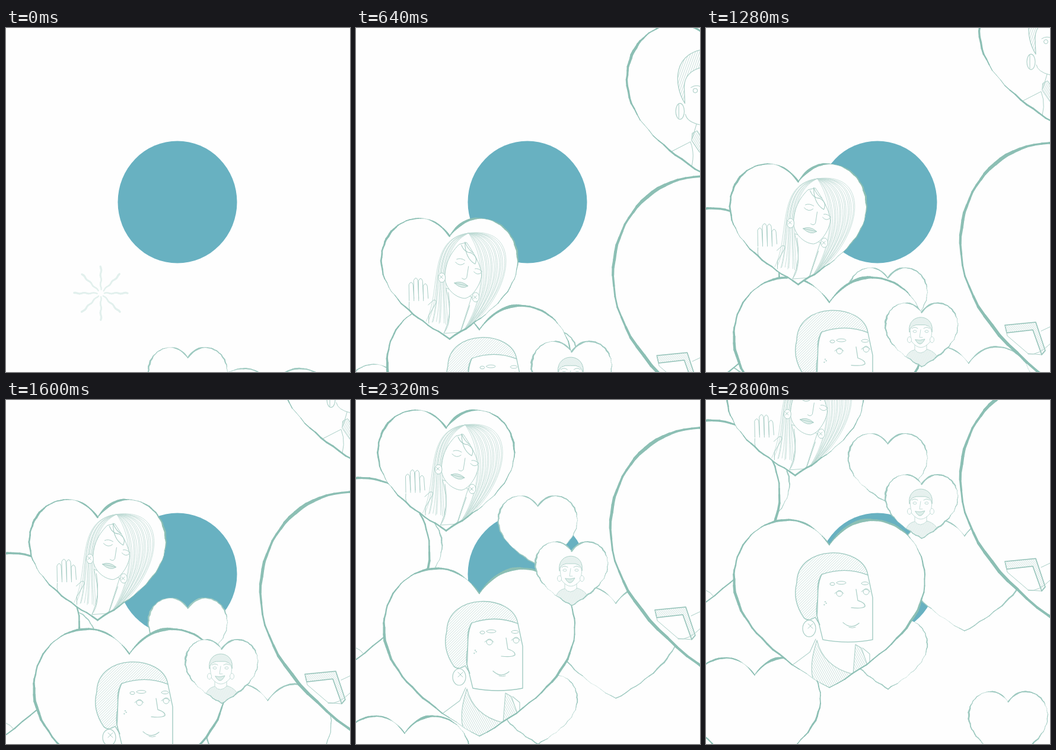
Write an HTML page with a canvas that moves like this. It is 580 by 580 pixels and loops after 2.88 s.

```html
<!DOCTYPE html>
<html lang="en">
<head>
<meta charset="utf-8">
<title>Floating hearts</title>
<style>
html, body { margin: 0; width: 100%; height: 100%; overflow: hidden; background: #fefefe; }
canvas { display: block; width: 580px; height: 580px; }
</style>
</head>
<body>
<canvas id="stage" width="580" height="580"></canvas>
<script>
const ctx = document.getElementById('stage').getContext('2d');
const LOOP = 2880, STEP = 80, POP_TIME = 480;
const REST = 2320;    // time at which x and y of each heart are given
const MIDDLE = .62;   // height of a heart's centre below its notch, in half widths
const PAPER = '#fefefe', INK = '#a9cec6', STRONG = '#9cc8bf', SOFT = '#bddad4';

const bezier = (a, b, c, d, t) => {
  const u = 1 - t;
  return u * u * u * a + 3 * u * u * t * b + 3 * u * t * t * c + t * t * t * d;
};

// Left half of a heart in half widths, notch at the origin, then mirrored.
const HALF = [
  [0, 0, -.12, -.17, -.28, -.27, -.45, -.26],
  [-.45, -.26, -.78, -.25, -1, .03, -1, .36],
  [-1, .36, -1, .82, -.55, 1.18, 0, 1.5]
];
const leftSide = HALF.flatMap(c => Array.from({ length: 20 }, (_, i) => [
  bezier(c[0], c[2], c[4], c[6], i / 20),
  bezier(c[1], c[3], c[5], c[7], i / 20)
])).concat([[0, 1.5]]);
const outline = leftSide.concat(leftSide.slice(0, -1).reverse().map(([x, y]) => [-x, y]));

function line(d, width = 1, color = INK, fill) {
  const path = new Path2D(d);
  if (fill) { ctx.fillStyle = fill; ctx.fill(path); }
  ctx.lineWidth = width;
  ctx.strokeStyle = color;
  ctx.stroke(path);
}

function hatched(d, slope, gap, width, color = INK) {
  ctx.save();
  ctx.clip(new Path2D(d));
  ctx.beginPath();
  for (let x = -600; x < 1300; x += gap) {
    ctx.moveTo(x, 0);
    ctx.lineTo(x - 600 * slope, 600);
  }
  ctx.lineWidth = .8;
  ctx.strokeStyle = SOFT;
  ctx.stroke();
  ctx.restore();
  line(d, width, color);
}

function oval(x, y, rx, ry = rx, width = 1, color = INK, fill) {
  line(`M${x - rx} ${y}a${rx} ${ry} 0 1 1 ${2 * rx} 0a${rx} ${ry} 0 1 1 ${-2 * rx} 0`, width, color, fill);
}

// Shallow arch used for brows, lids and mouths; a negative bend sags.
function arch(x, y, span, bend, width = 1, tilt = 0) {
  line(`M${x} ${y}q${span / 2} ${tilt / 2 - bend} ${span} ${tilt}`, width);
}

const cross = (x, y, r) => line(`M${x - r} ${y - r}l${2 * r} ${2 * r}m0 ${-2 * r}l${-2 * r} ${2 * r}`);

function drawMan() {
  line('M195 376C185 398 190 425 187 445L197 486Q240 494 281 486L281 415L273 377', 1.3, STRONG);
  hatched('M184 448Q172 456 165 449Q145 420 153 390C154 324 265 326 273 377Q235 362 195 376C183 395 192 410 187 425Q184 445 192 461Z', 1, 4.4, 1.3, STRONG);
  oval(174, 467, 11, 14, 1.2, INK, PAPER);
  cross(176, 463, 4);
  oval(213, 392, 4, 2.5);
  oval(228, 390, 8, 2.5);
  oval(268, 391, 6, 2.5);
  for (const x of [225, 270]) {
    oval(x, 408 - (x - 225) / 15, 5);
    arch(x - 8, 408 - (x - 225) / 15, 15, 8);
  }
  line('M253 401L256 420Q269 424 268 430Q263 434 245 432', 1.2);
  arch(231, 457, 27, -12, 1.2, 1);
  arch(241, 465, 11, -2);
  for (let i = 0; i < 3; i++) oval(201 + 2 * Math.sin(i * 2), 422 + i * 2.5, .7);
  hatched('M187 487C181 507 175 528 180 552L208 567L274 534L262 500L252 494L248 544Q198 532 187 487Z', -.55, 3.5, 1.1);
  line('M185 485L175 507L144 530M276 531L276 510L264 500', 1.1);
}

// Sweep of hair from the crown, spread from an inner to an outer curve.
function strands(count, inner, outer) {
  for (let i = 0; i <= count; i++) {
    const p = inner.map((v, k) => v + (outer[k] - v) * i / count + Math.sin(i * 2.3 + k) * 1.5);
    line(`M184 42C${p}`, .8, SOFT);
  }
}

function drawWoman() {
  strands(15, [205, 70, 218, 130, 182, 200], [275, 30, 265, 140, 175, 208]);
  strands(9, [140, 62, 142, 120, 150, 195], [112, 50, 140, 140, 113, 190]);
  line('M146 135Q160 190 142 211L170 209L189 150Z', .9, INK, PAPER);
  line('M168 61C149 80 145 98 144 116C144 133 160 151 178 152C193 149 206 124 206 112C205 94 191 73 181 58Z', 1, INK, PAPER);
  line('M172 62Q177 75 188 75Q201 82 195 94Q178 84 178 57Q183 70 192 75', 1.1, INK, PAPER);
  oval(139, 117, 6, 8, 1, INK, PAPER);
  oval(196, 150, 6, 8, 1, INK, PAPER);
  cross(138, 116, 2.5);
  cross(195, 150, 2.5);
  arch(162, 91, 15, -7, 1, 2);
  arch(164, 86, 14, 4, 1, 2);
  arch(193, 107, 12, -6, 1, 2);
  arch(195, 102, 12, 4, 1, 5);
  line('M184 98L181 117Q178 122 173 118');
  line('M160 126Q172 121 183 131Q173 138 160 126L183 131', 1, INK, '#dfeeea');
  line('M150 142Q157 180 143 210M186 164L171 208');
  line('M84 158Q82 175 91 181V190M116 163L125 155Q131 154 129 160L117 181V194');
  for (let i = 0; i < 4; i++) {
    const x = 84 + i * 8, top = 121 + 4 * (i - 1.4) ** 2;
    line(`M${x} 156L${x - .5} ${top}q4 -8 7 0L${x + 8} 152`);
  }
}

function drawBoy() {
  line('M344 286L346 303Q362 325 379 303L381 286', .9, SOFT);
  hatched('M343 288C338 255 386 255 381 288Q379 274 362 276Q344 274 343 288Z', .6, 2.2, .9);
  for (const side of [-1, 1]) {
    oval(362 + side * 19, 301, 3.5, 5, .9, SOFT, PAPER);
    oval(362 + side * 10, 287, 3, 2, .9, SOFT);
    arch(362 + side * 10 - 5, 282, 10, 4, .9);
    line(`M${362 + side * 10} 310v8`, .9, SOFT);
  }
  line('M362 284L360 297H365', .9, SOFT);
  line('M353 301Q361 303 369 300Q361 316 353 301Z', .9, INK, '#dfeeea');
  hatched('M336 334Q340 320 352 318Q361 329 373 317Q388 322 391 333L363 348Z', -.7, 2.4, .9, SOFT);
}

function drawBook() {
  hatched('M504 354L556 349L572 397L566 404L551 362L507 367Z', .8, 3.2, 1.5, '#92c1b7');
  line('M504 354L508 372L543 402L566 404M543 403Q560 406 582 384M565 364L582 356');
}

function drawListener() {
  hatched('M556 132C538 104 532 44 600 42V70C560 74 554 92 555 108Z', .35, 3.5, 1.2);
  oval(548, 145, 7, 13, 1.1, INK, PAPER);
  line('M546 134V156M557 150Q559 162 580 167M575 166L568 190');
  arch(566, 106, 18, 6);
  oval(573, 111, 3.5);
  hatched('M568 181L576 177L600 212H580L567 193Z', .5, 3, 1);
  line('M526 215L565 195Q575 220 562 250');
}

const drawSleeve = () => line('M-8 416Q11 419 15 434');

// x, y: notch at REST. rise: upward speed, acceleration and jerk there, per second.
const hearts = [
  { x: 55, y: 213, half: 90, rise: [222, -20, -30], drift: -9, pen: 1.6 },
  { x: -78, y: 184, half: 202, rise: [194, 40, -40], pen: 2.8, pop: 700, art: drawSleeve },
  { x: 438, y: 343, half: 107, rise: [241, 4, -139], drift: -4.5, pen: 1.6 },
  { x: 306.5, y: 179, half: 66.5, rise: [235, -45, -139], pen: 1.5 },
  { x: 307, y: 481, half: 66, rise: [183, 45, 0], pen: 1.3 },
  { x: 82, y: 562, half: 111, rise: [195, 40, 0], pen: 2 },
  { x: 509.5, y: 612, half: 66.5, rise: [205, 40, 0], pen: 1.5 },
  { x: 608, y: -250, half: 147, rise: [200, -30, -118], pen: 2.6, pop: 220, art: drawListener, anchor: [608, 40] },
  { x: 702, y: 118, half: 273, rise: [165, 30, -45], pen: 4, pop: 495, art: drawBook },
  { x: 208, y: 326, half: 161, rise: [161, 45, -35], pen: 2.6, pop: 500, art: drawMan },
  { x: 363.5, y: 255, half: 61, rise: [241, 0, -139], pen: 1.6, pop: 300, art: drawBoy },
  { x: 152, y: 47, half: 115, rise: [207, -35, -118], drift: -3.4, pen: 2.1, pop: 80, art: drawWoman }
];

function notchAt({ x, y, rise: [speed, gain, jerk], drift = 0 }, t) {
  const s = (t - REST) / 1000;
  return [x + drift * s, y - s * (speed + s * (gain / 2 + s * jerk / 6))];
}

// Back-out easing, about 15% overshoot.
function popScale(start, t) {
  if (start === undefined) return 1;
  const p = (t - start) / POP_TIME;
  if (p <= 0) return 0;
  if (p >= 1) return 1;
  const q = p - 1;
  return 1 + 3.2 * q ** 3 + 2.2 * q ** 2;
}

function drawSparkle(x, y, age) {
  ctx.save();
  ctx.translate(x, y);
  ctx.globalAlpha = 1 - age * .6;
  ctx.strokeStyle = '#e2f0ed';
  for (let i = 0; i < 8; i++) {
    ctx.rotate(Math.PI / 4);
    for (let r = 6 + age * 30; r < 43 + age * 20; r += 3) {
      ctx.lineWidth = 2 + r / 30;
      ctx.beginPath();
      ctx.moveTo(r, .8 * Math.sin(r * .4 + i));
      ctx.lineTo(r + 3, .8 * Math.sin(r * .4 + 1.2 + i));
      ctx.stroke();
    }
  }
  ctx.restore();
}

// Brushed outline: the width swells along the way.
function drawOutline({ half, pen }, seed) {
  const point = i => {
    const r = half + .6 * Math.sin(i * 1.9 + seed);
    return [outline[i][0] * r, outline[i][1] * r];
  };
  ctx.strokeStyle = half < 110 ? '#9fcac1' : '#8cbfb4';
  for (let i = 0; i < outline.length - 1; i++) {
    const swell = Math.sin(i * .23 + seed) * .4 + Math.sin(i * .61 + seed * 2) * .25;
    const accent = Math.exp(-((i - 108) ** 2) / 50) + .5 * Math.exp(-((i - 38) ** 2) / 60);
    ctx.lineWidth = pen * (.85 + swell + accent);
    ctx.beginPath();
    ctx.moveTo(...point(i));
    ctx.lineTo(...point(i + 1));
    ctx.stroke();
  }
}

function drawHeart(heart, seed, t) {
  const { half, pop, art } = heart;
  const [x, y] = notchAt(heart, t), middle = half * MIDDLE;
  const age = (t - pop + STEP) / (3 * STEP);
  if (age >= 0 && age < 1) drawSparkle(x, y + middle, age);
  const scale = popScale(pop, t);
  if (!scale) return;

  ctx.save();
  ctx.translate(x, y + middle);
  ctx.scale(scale, scale);
  ctx.translate(0, -middle);
  const body = new Path2D();
  outline.forEach(([px, py]) => body.lineTo(px * half, py * half));
  ctx.fillStyle = PAPER;
  ctx.fill(body);
  if (art) {
    const [ax, ay] = heart.anchor || [heart.x, heart.y];
    ctx.save();
    ctx.clip(body);
    ctx.translate(-ax, -ay);
    art();
    ctx.restore();
  }
  drawOutline(heart, seed);
  ctx.restore();
}

function draw(t) {
  ctx.fillStyle = PAPER;
  ctx.fillRect(0, 0, 580, 580);
  ctx.fillStyle = '#68b1c1';
  ctx.beginPath();
  ctx.ellipse(289, 293.5, 100.5, 103, 0, 0, Math.PI * 2);
  ctx.fill();
  hearts.forEach((heart, i) => drawHeart(heart, i * 1.7 + 1, t));
}

ctx.lineCap = ctx.lineJoin = 'round';
const begin = performance.now();
function tick() {
  const t = Math.max(0, performance.now() - begin) % LOOP;
  draw(Math.floor(t / STEP) * STEP);
  requestAnimationFrame(tick);
}
tick();
</script>
</body>
</html>
```
